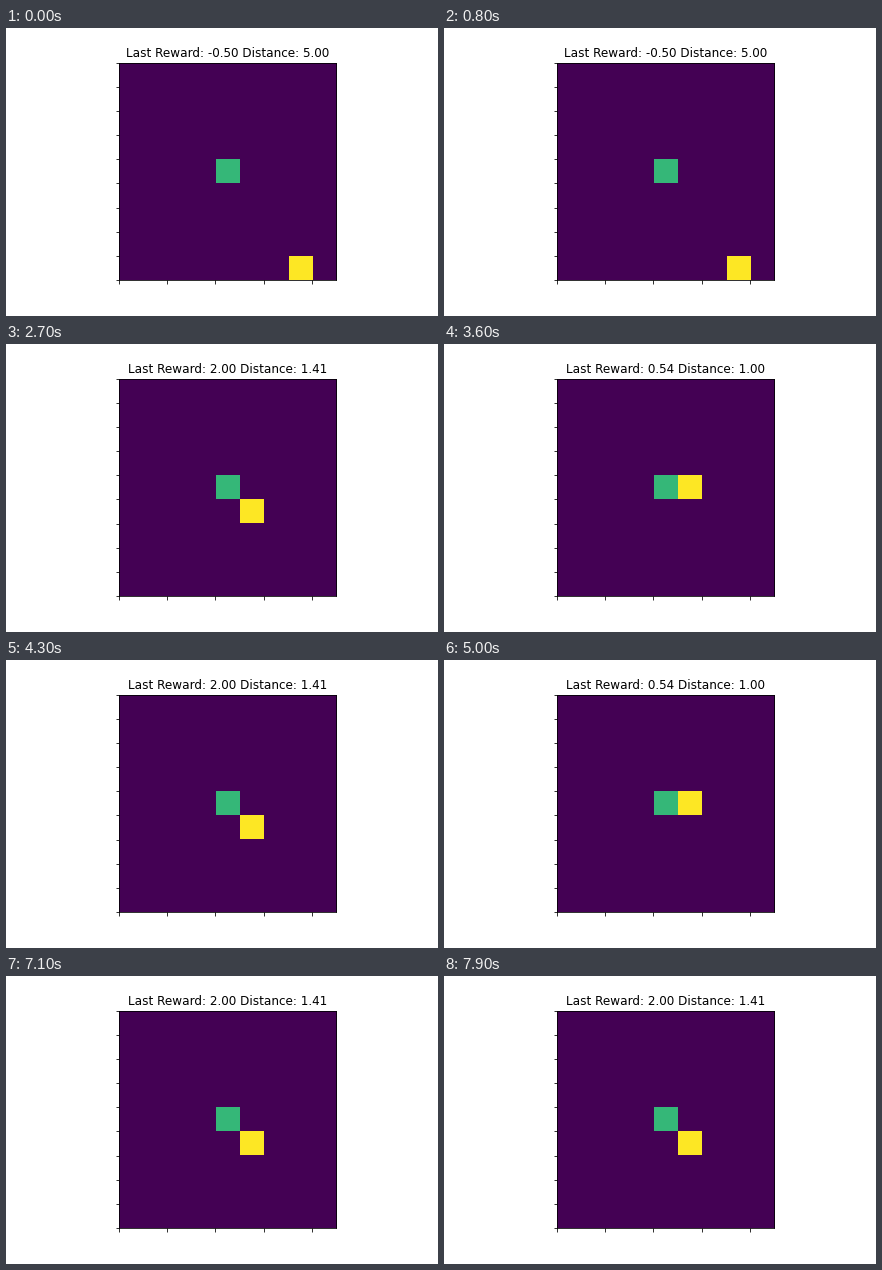
Recreate the animation shown at these times as a matplotlib script. Size 432x288 px, loop 8 s.

```python
import numpy as np
import matplotlib.pyplot as plt
from matplotlib.animation import FuncAnimation

SIZE = 9
GOAL = (4, 4)
GOAL_VALUE, AGENT_VALUE = 2, 3

plt.rcParams.update({"font.family": "DejaVu Sans", "font.size": 10})

# Agent cells as (column, row), one per step.
swing = [(5, 5), (5, 4)]
path = (
    [(7, 8), (6, 8)] * 5
    + [(7, 8), (8, 8), (8, 7), (7, 7), (7, 6), (7, 5), (6, 5)]
    + swing * 13
    + [(5, 5), (5, 6), (6, 6), (6, 5)]
    + swing * 14
    + [(5, 5), (6, 5)]
    + swing
    + [(5, 5)]
)


def reward(dist):
    if dist < 1.2:
        return np.cos(dist)
    return 2.0 if dist < 1.5 else -0.5


def board(cell):
    grid = np.zeros((SIZE, SIZE))
    grid[GOAL[1], GOAL[0]] = GOAL_VALUE
    grid[cell[1], cell[0]] = AGENT_VALUE
    return grid


def caption(cell):
    dist = np.hypot(cell[0] - GOAL[0], cell[1] - GOAL[1])
    return f"Last Reward: {reward(dist):.2f} Distance: {dist:.2f}"


fig, ax = plt.subplots(figsize=(6, 4), dpi=72)
fig.subplots_adjust(left=0.125, right=0.9, bottom=0.125, top=0.88)
image = ax.imshow(board(path[0]), cmap="viridis", vmin=0, vmax=AGENT_VALUE,
                  interpolation="nearest", extent=(0, SIZE, SIZE, 0))
ax.set_xticks(range(0, SIZE, 2), labels=[])
ax.set_yticks(range(SIZE + 1), labels=[])
title = ax.set_title(caption(path[0]), fontsize=12, pad=6)


def update(i):
    image.set_data(board(path[i]))
    title.set_text(caption(path[i]))
    return image, title


anim = FuncAnimation(fig, update, frames=len(path), interval=100,
                     repeat=True, repeat_delay=0, blit=False)
plt.show()
```
